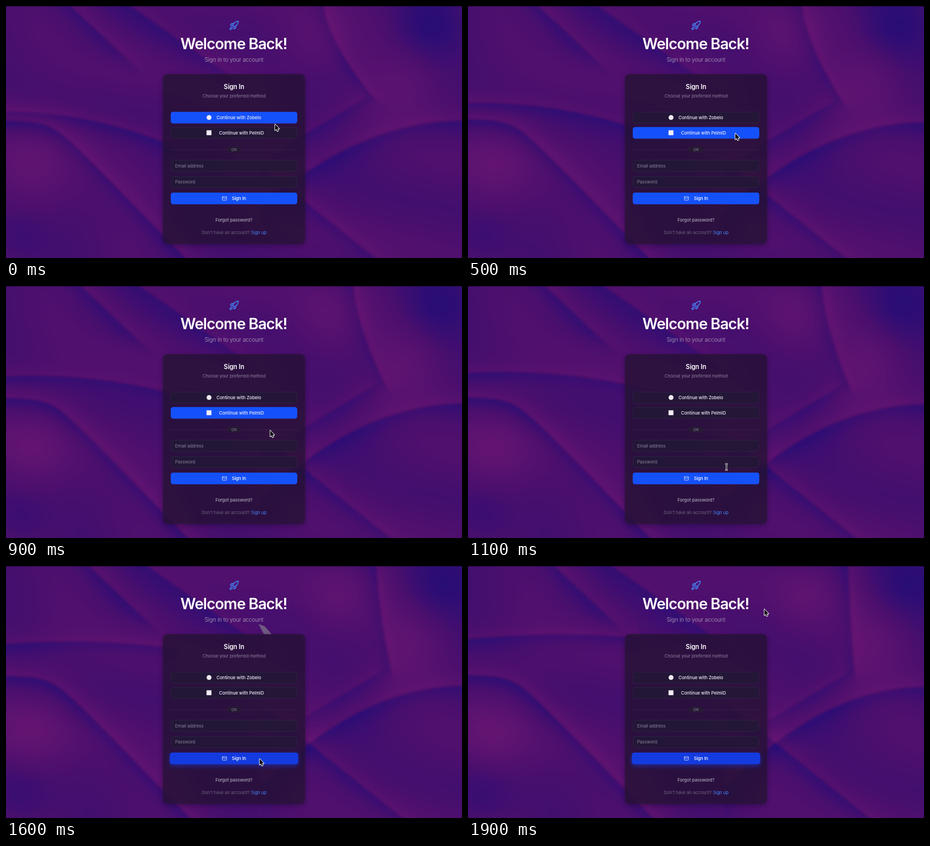
Write an HTML page with a canvas that moves like this. It is 800 px wide and 443 px high and loops after 2 s.

```html
<!DOCTYPE html>
<html lang="en">
<head>
<meta charset="utf-8">
<title>Sign in</title>
<style>
  html, body { margin: 0; width: 100%; height: 100%; overflow: hidden; background: #4a0f6c; }
  canvas { display: block; width: 800px; height: 443px; }
</style>
</head>
<body>
<canvas id="stage" width="800" height="443"></canvas>
<script>
const W = 800, H = 443, LOOP = 2000, STEP = 100;
const ctx = document.getElementById('stage').getContext('2d');
const silk = document.createElement('canvas');
silk.width = W / 2;
silk.height = Math.ceil(H / 2);
const sctx = silk.getContext('2d');
const pixels = sctx.createImageData(silk.width, silk.height);

const BLUE = '#1551fb', LINK = '#4585fa', PALE = '#f1eef7', DIM = '#888199';
const INDIGO = [40, 13, 118], PURPLE = [75, 15, 109], MAGENTA = [99, 20, 113];

const { exp, tanh, abs, sqrt, sin, hypot } = Math;
const lerp = (a, b, k) => a + (b - a) * k;
const ramp = (a, b, v) => {
  const k = Math.min(1, Math.max(0, (v - a) / (b - a)));
  return k * k * (3 - 2 * k);
};

// A fold is lit on its negative side, shaded on the positive, with a thin crease between
const fold = (d, width, gain) =>
  gain * (-tanh(d / 4) * exp(-abs(d) / width) - .4 * exp(-d * d / 12));
const spot = (x, y, cx, cy, r) => exp(-((x - cx) ** 2 + (y - cy) ** 2) / (r * r));

// Tone of the silk: -1 indigo, 0 purple, 1 magenta; k runs 0..1 over the loop
function tone(x, y, k) {
  let v = .22 * sin(x / 62 - y / 48 + 1.4 * sin(y / 85 + x / 140 - k));

  if (x < 300) {
    const u = x / 280;
    const ridge = lerp(187 + 55 * u * u, 130 - 28 * u + 24 * u * u, k);
    v += fold(y - ridge, 14, .75);
  }
  if (x < 420) {
    const s = x - 80;
    const drape = 200 - 10 * k + .52 * (s + sqrt(s * s + 900));
    v += fold((y - drape) / lerp(1, 1.44, ramp(60, 120, x)), 19, .85);
    v += fold((y - .95 * (x - 112 - 38 * k)) / 1.38, 24, .7) * ramp(135, 70, y);
  }
  if (x > 150 && x < 600)
    v += fold((y - .7 * (x - 216 - 35 * k)) / 1.22, 26, .6) * ramp(170, 90, y);

  if (x > 450) {
    const edge = 556 + 110 * k + 78 * (1 - .9 * k) * (y / 150) ** 1.5;
    const tip = 160 + 30 * k;
    v += fold((edge - x) / 1.1, 17, .8) * ramp(tip + 20, tip - 10, y);
    const under = tip + .6 * (636 + 30 * k - x);
    v += fold((y - under) / 1.17, 16, .5) * ramp(650 + 30 * k, 620 + 30 * k, x);
    const q = (800 - x) / 275;
    v += fold((y - 203 - 11 * k - (92 + 18 * k) * q * q) / lerp(1, 1.25, q), 20, .8);
    v += fold((y - 350 + 45 * k - .8 * (x - 530)) / 1.28, 18, .7);
  }

  v += .8 * spot(x, y, 40, 295, 75) - .5 * spot(x, y, 20, 405, 50);
  v += .6 * spot(x, y, 540 + 50 * k, 60, 60) - .8 * spot(x, y, 740 + 30 * k, 35, 65);
  return v + .5 * spot(x, y, 710, 130, 60);
}

function drawSilk(t) {
  const k = t / 1900, data = pixels.data;
  for (let i = 0; i < data.length; i += 4) {
    const n = i / 4, col = n % silk.width;
    const v = tone(col * 2 + 1, (n - col) / silk.width * 2 + 1, k);
    const end = v < 0 ? INDIGO : MAGENTA, mix = Math.min(1.15, abs(v));
    for (let c = 0; c < 3; c++) data[i + c] = lerp(PURPLE[c], end[c], mix);
    data[i + 3] = 255;
  }
  sctx.putImageData(pixels, 0, 0);
}

const paintSilk = () => ctx.drawImage(silk, 0, 0, silk.width * 2, silk.height * 2);

function box(x, y, w, h, r, fill, stroke) {
  ctx.beginPath();
  ctx.roundRect(x, y, w, h, r);
  if (fill) { ctx.fillStyle = fill; ctx.fill(); }
  if (stroke) { ctx.strokeStyle = stroke; ctx.lineWidth = .8; ctx.stroke(); }
}

function withShadow(color, blur, draw) {
  ctx.save();
  ctx.shadowColor = color;
  ctx.shadowBlur = blur;
  ctx.shadowOffsetY = 3;
  draw();
  ctx.restore();
}

function text(str, x, y, color, { size = 7.78, weight = 400, align = 'center', gap = -.1 } = {}) {
  ctx.font = `${weight} ${size}px Inter, sans-serif`;
  ctx.letterSpacing = gap + 'px';
  ctx.textAlign = align;
  ctx.fillStyle = color;
  ctx.fillText(str, x, y);
}

function icon(paths, x, y, size, color) {
  ctx.save();
  ctx.translate(x, y);
  ctx.scale(size / 24, size / 24);
  ctx.strokeStyle = color;
  ctx.lineWidth = 2;
  ctx.lineCap = ctx.lineJoin = 'round';
  for (const d of paths) ctx.stroke(new Path2D(d));
  ctx.restore();
}

const ROCKET = [
  'M4.5 16.5c-1.5 1.3-2 5-2 5s3.7-.5 5-2c.7-.8.7-2.1 0-2.9a2.2 2.2 0 0 0-3-.1z',
  'm12 15-3-3a22 22 0 0 1 2-4A13 13 0 0 1 22 2c0 2.7-.8 7.5-6 11a22 22 0 0 1-4 2z',
  'M9 12H4s.5-3 2-4c1.6-1 5 0 5 0',
  'M12 15v5s3-.5 4-2c1-1.6 0-5 0-5'
];
const MAIL = ['M4 4h16a2 2 0 0 1 2 2v12a2 2 0 0 1-2 2H4a2 2 0 0 1-2-2V6a2 2 0 0 1 2-2z', 'm22 7-10 6L2 7'];

function drawCard() {
  const shape = [275.5, 120, 249, 298, 8];
  withShadow('rgba(15,5,35,.4)', 9, () => box(...shape, '#2c1040'));
  ctx.save();
  ctx.beginPath();
  ctx.roundRect(...shape);
  ctx.clip();
  ctx.filter = 'blur(5px)';
  paintSilk();
  ctx.restore();
  box(...shape, 'rgba(32,18,44,.71)', 'rgba(48,26,68,.5)');
}

function row(y, active) {
  if (active) box(289, y, 222, 20.6, 4.5, BLUE);
  else box(289.4, y + .4, 221.2, 19.8, 4.5, 'rgba(32,26,50,.62)', 'rgba(62,55,84,.5)');
}

function provider(name, y, x, active, drawMark) {
  row(y, active);
  ctx.fillStyle = PALE;
  ctx.beginPath();
  drawMark();
  ctx.fill();
  text('Continue with ' + name, x, y + 12.9, PALE, { weight: 500, align: 'left', gap: -.04 });
}

function input(label, y) {
  row(y);
  text(label, 296.7, y + 13, DIM, { align: 'left' });
}

function drawPage(t) {
  text('Welcome Back!', 399.6, 75.5, '#fff', { size: 26.67, weight: 600, gap: -.92 });
  text('Sign in to your account', 400, 97.5, '#9783ac', { size: 10, gap: -.25 });
  icon(ROCKET, 391.1, 25.3, 17.8, LINK);

  drawCard();
  text('Sign In', 400, 145.5, '#fff', { size: 11.1, weight: 600 });
  text('Choose your preferred method', 400, 161, '#8b7d9c');

  provider('Zobelo', 186, 369.3, t < 200, () => ctx.arc(356.2, 196, 4.3, 0, 7));
  provider('PelmID', 212.7, 373.8, t >= 200 && t < 1000, () => ctx.rect(351.8, 218.5, 8.6, 8.6));

  ctx.fillStyle = 'rgba(72,58,94,.5)';
  ctx.fillRect(289, 252.2, 222, .7);
  box(388, 247.6, 24, 10, 2, '#261a33');
  text('OR', 400, 255.1, DIM, { size: 6.67, gap: 0 });

  input('Email address', 270.6);
  input('Password', 299.4);

  if (t < 1300) row(328, true);
  else withShadow('rgba(25,70,255,.45)', 8, () => box(287.4, 328, 225.2, 20.6, 4.6, '#143be0'));
  icon(MAIL, 378.8, 333.9, 8.9, PALE);
  text('Sign In', 396.2, 341.1, '#fff', { weight: 500, align: 'left', gap: -.04 });

  text('Forgot password?', 400, 379, '#aaa3b5', { weight: 500 });
  text("Don't have an account?", 343.3, 401.2, '#6c627d', { align: 'left' });
  text('Sign up', 456.8, 401.2, LINK, { align: 'right' });
}

// Grey glint that slides past the upper edge of the card
function drawGlint(t) {
  if (t < 1400 || t > 1700) return;
  const s = (t - 1400) / 200;
  ctx.save();
  ctx.translate(428 + 15 * s, 108 - 6 * s);
  ctx.fillStyle = 'rgba(128,122,140,.7)';
  ctx.fill(new Path2D('M0 0L11 4L24 19H10Z'));
  ctx.restore();
}

// Pointer stops: time, x, y; each leg speeds up toward its end
const STOPS = [[0, 472, 208], [900, 463.5, 254], [1100, 453.5, 318], [1300, 445, 339], [1700, 445, 339], [1900, 520, 76]];

function pointer(t) {
  const i = Math.max(1, STOPS.findIndex(s => s[0] >= t));
  const [t0, x0, y0] = STOPS[i - 1], [t1, x1, y1] = STOPS[i];
  const k = ((t - t0) / (t1 - t0)) ** 1.8;
  return [lerp(x0, x1, k), lerp(y0, y1, k)];
}

const ARROW = new Path2D('M0 0V10.6L2.4 8.4L4 12.1L5.7 11.4L4.1 7.8H7.4Z');
const BEAM = new Path2D('M-2.4-5.5Q0-5.5 0-4Q0-5.5 2.4-5.5M0-4V4M-2.4 5.5Q0 5.5 0 4Q0 5.5 2.4 5.5M-1.3 1.5H1.3');

function drawPointer(t) {
  const overInput = t >= 1000 && t < 1200;
  const shape = overInput ? BEAM : ARROW;
  ctx.save();
  ctx.translate(...pointer(t));
  ctx.lineJoin = 'round';
  ctx.strokeStyle = '#fff';
  ctx.lineWidth = overInput ? 2.2 : 1.7;
  ctx.stroke(shape);
  ctx.strokeStyle = ctx.fillStyle = '#0c0912';
  ctx.lineWidth = .8;
  if (overInput) ctx.stroke(shape);
  else ctx.fill(shape);
  ctx.restore();
}

let shown = -1;
function frame() {
  const t = Math.floor(performance.now() % LOOP / STEP) * STEP;
  if (t !== shown) {
    shown = t;
    drawSilk(t);
    paintSilk();
    ctx.fillStyle = 'rgba(20,8,45,.75)';
    ctx.fillRect(0, 0, W, 1);
    drawGlint(t);
    drawPage(t);
    drawPointer(t);
  }
  requestAnimationFrame(frame);
}
frame();
</script>
</body>
</html>
```
